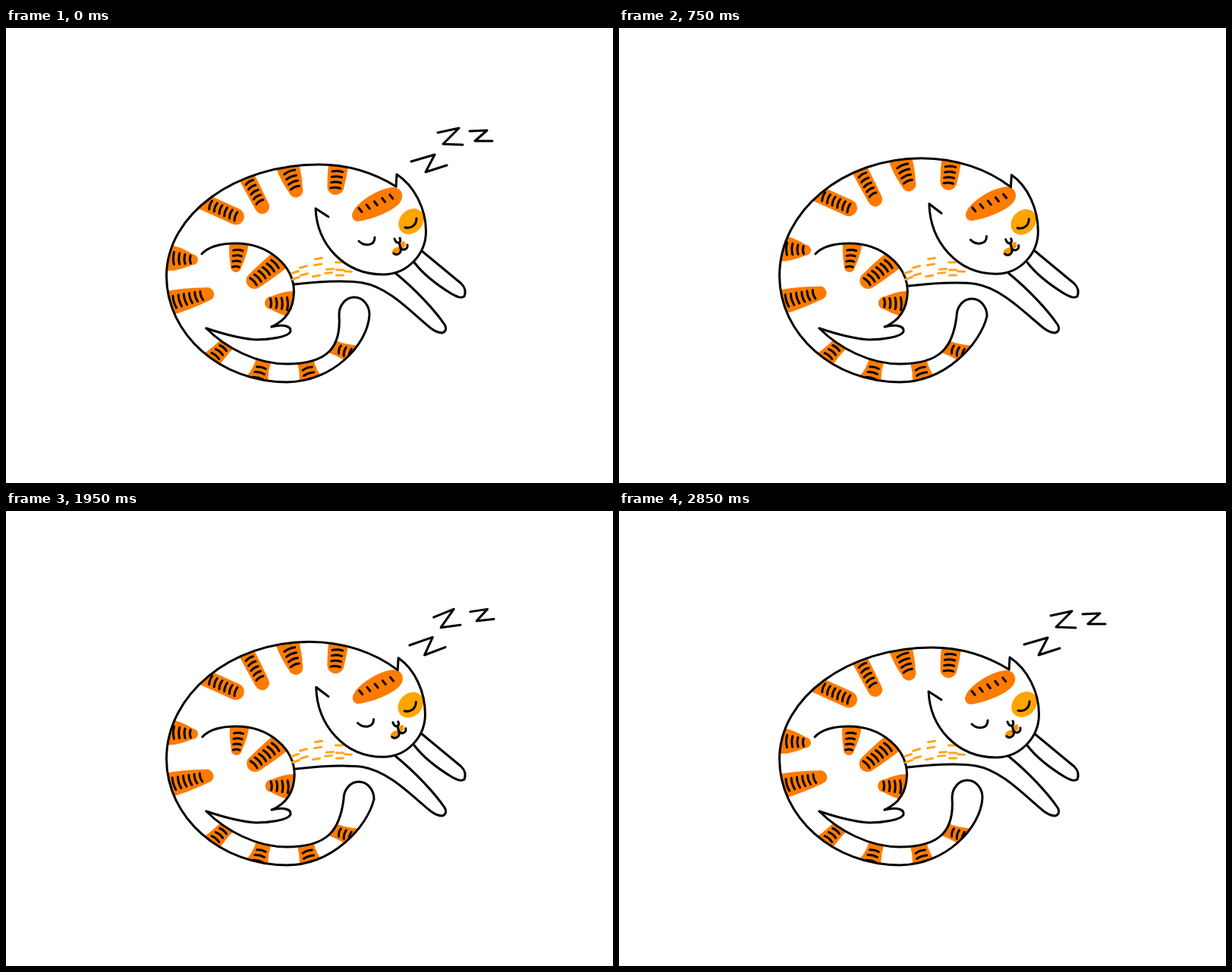
Write an HTML page with a canvas that moves like this. It is 800 by 600 pixels and loops after 2880 ms.

```html
<!DOCTYPE html>
<html>
<head>
<meta charset="utf-8">
<style>
html, body { margin: 0; width: 100%; height: 100%; overflow: hidden; background: #fff }
canvas { display: block }
</style>
</head>
<body>
<canvas width="800" height="600"></canvas>
<script>
const ctx = document.querySelector('canvas').getContext('2d');
const LOOP = 2880, ORANGE = '#ff7b00', AMBER = '#ffa500';
const clamp = x => Math.max(0, Math.min(1, x));
const ease = x => (1 - Math.cos(Math.PI * clamp(x))) / 2;

function line(path, color = '#000') {
  ctx.strokeStyle = color;
  ctx.stroke(new Path2D(path));
}

function fill(path, color) {
  ctx.fillStyle = color;
  ctx.fill(new Path2D(path));
}

function shifted(dx, dy, paint) {
  ctx.save();
  ctx.translate(dx, dy);
  paint();
  ctx.restore();
}

// quarter ellipse; the first end is flat (horizontal) or upright (vertical)
function quarter(x0, y0, x1, y1, flat) {
  const k = 0.55, dx = (x1 - x0) * k, dy = (y1 - y0) * k;
  return flat ? `C${x0 + dx},${y0} ${x1},${y1 - dy} ${x1},${y1}`
    : `C${x0},${y0 + dy} ${x1 - dx},${y1} ${x1},${y1}`;
}

// tapered band with a round tip and evenly spaced rungs across it
function stripe(x0, y0, x1, y1, w0, w1, rungs) {
  const len = Math.hypot(x1 - x0, y1 - y0), a = w0 / 2, b = w1 / 2;
  ctx.save();
  ctx.translate(x0, y0);
  ctx.rotate(Math.atan2(y1 - y0, x1 - x0));
  fill(`M-8,${-a} L0,${-a} Q${len / 3},${-a} ${len - b},${-b} A${b},${b} 0 0 1 ${len - b},${b}
    Q${len / 3},${a} 0,${a} L-8,${a} Z`, ORANGE);
  for (let i = 0; i < rungs; i++) {
    const x = 8 + 7.3 * i, half = 0.27 * (w0 + (w1 - w0) * x / len);
    line(`M${x},${-half} Q${x - 1.5},0 ${x + 1},${half}`);
  }
  ctx.restore();
}

function body(b, wag) {
  const topX = 412 - 17 * b, topY = 180 - 10.5 * b;
  const tipX = 459 + 6 * wag, tipY = 355 + 2 * wag, r = 20, side = tipY + 23;
  const outline = `M${514 + 3 * b},${209 + b} C${485 + b},${191 - 6 * b} ${topX + 38 + 10 * b},${topY} ${topX},${topY}`
    + quarter(topX, topY, 211.5, 327, true) + quarter(211.5, 327, 370, 467, false)
    + `C430,467 ${477 - wag},${418 - wag} ${tipX + r},${side}`
    + quarter(tipX + r, side, tipX, tipY, false) + quarter(tipX, tipY, tipX - r, side, true)
    + `C${442 - 2 * wag},420 425,443 370,443 C330,443 290,422 264,396`;

  ctx.save();
  ctx.clip(new Path2D(outline));
  // the back rises more toward the rear
  const back = (x, ...rest) => shifted(0, -b * (8 + (435 - x) / 28), () => stripe(x, ...rest));
  back(438, 181, 433, 220, 26, 22, 4);
  back(371, 182, 385, 223, 30, 19, 4);
  back(317, 196, 342, 244, 21, 19, 5);
  back(262, 230, 313, 253, 22, 22, 6);
  back(213, 303, 253, 306, 34, 14, 4);
  shifted(-b, -2 * b, () => stripe(214, 363, 274, 349, 32, 18, 6));
  stripe(292, 416, 261, 448, 20, 26, 3);
  stripe(339, 440, 327, 478, 20, 30, 3);
  stripe(395, 441, 406, 482, 22, 32, 3);
  stripe(432, 421, 474, 437, 18, 28, 3);
  ctx.restore();
  line(outline);
}

function haunch(b) {
  const outline = 'M258,298 C268,287 285,284 303,284' + quarter(303, 284, 379.5, 348, true)
    + 'C379,372 368,386 350,394';
  shifted(b, 0, () => {
    ctx.save();
    ctx.clip(new Path2D(outline));
    stripe(307, 285, 302, 322, 25, 14, 4);
    stripe(361, 306, 319, 340, 27, 22, 6);
    stripe(379, 364, 341, 362, 34, 17, 4);
    ctx.restore();
    line(outline);
  });
  line('M350,394 C368,390 376,394 375,400 C372,408 345,411 330,411 C310,410 285,403 264,396');
}

function legsAndChest(b) {
  line('M548,294 L600,337 C606,343 606,349 604,354 C599,357 594,354 588,351 C570,340 550,325 538,309');
  line(`M513,323 C540,345 565,372 578,391 C582,398 578,401 575,402 C568,402 564,399 560,396
    C535,376 505,${342 + 2 * b} 470,${336 + 2 * b} C445,${332 + 3 * b} 415,${334 + 3 * b} 380,${338 + 3 * b}`);
  const spots = [[412, 304], [411, 312], [392, 315], [381, 322], [382, 330], [393, 325], [409, 327],
    [425, 323], [427, 318], [439, 309], [440, 319], [451, 321], [440, 326]];
  for (const [x, y] of spots) {
    const rise = (440 - x) / 40;
    line(`M${x - 4.5},${y + rise} L${x + 4.5},${y - rise}`, '#ffa51f');
  }
}

function head(b, ear) {
  shifted(b, -b, () => {
    fill('M457,251 C450,239 485,212 510,210 C522,210 524,222 521,227 C515,241 480,253 464,255 Q459,255 457,251', ORANGE);
    for (let i = 0; i < 5; i++) {
      const x = 467 + 10.2 * i, y = 240 - 4.4 * i;
      line(`M${x - 2},${y - 2.5} L${x + 2},${y + 2.5}`);
    }
  });
  shifted(-b, b, () => {
    ctx.fillStyle = AMBER;
    ctx.beginPath();
    ctx.ellipse(534, 255, 18.5, 15, -0.8, 0, 7);
    ctx.fill();
    line('M526,263 C534,265 541,260 541,251');
  });
  shifted(-2 * b, -2 * b, () => line('M465,281 C472,288 486,288 486,276'));
  shifted(-3 * b, b, () => {
    fill('M520,289 C510,287 505,298 512,300 C520,300 522,295 520,289 Q517,283 525,281 Q530,289 520,291', '#ff9500');
    line('M512,278 Q514,284 518,283 Q521,281 519,277 M518,283 L520,290');
    line('M511,297 C515,301 522,297 520,290 C523,294 530,292 529,286');
  });

  const tip = `${408 - 7 * ear + b},${238 + 9 * ear - 8 * b}`, rightX = 553.5 - 1.5 * b;
  line(`M${514 + 3 * b},${209 + b} L${515 + 3 * b},${193 + b} C${538 + b},${208 + b} ${rightX},238 ${rightX},268`
    + quarter(rightX, 268, 497, 325 - b, false)
    + `C445,${325 - b} ${410 + 3 * ear},${285 - 5 * b} ${tip}
    Q${416 - 5 * ear},${243 + ear - 7 * b} ${425 - 2 * ear},${249 - 6 * b}`);
}

function zed(x, y, tilt, scale, shape) {
  ctx.save();
  ctx.translate(x, y);
  ctx.rotate(tilt);
  ctx.scale(scale, scale);
  if (scale > 0) line(shape);
  ctx.restore();
}

function draw(t) {
  const b = t < 1260 ? ease(t / 1080) : 1 - ease((t - 1440) / 1440);
  const wag = ease(t / 500) * (1 - ease((t - 2340) / 520));
  const ear = Math.sin(Math.PI * clamp((t - 2160) / 240));

  ctx.fillStyle = '#fff';
  ctx.fillRect(0, 0, 800, 600);
  ctx.lineCap = ctx.lineJoin = 'round';
  ctx.lineWidth = 3;
  body(b, wag);
  haunch(b);
  legsAndChest(b);
  head(b, ear);

  // the letters appear and leave one after another
  const size = i => t < 1000
    ? 1 - ease((t - 120 - 90 * i) / 150)
    : Math.sin(Math.PI / 2 * clamp((t - 1416 - 97 * i) / 150));
  zed(553 - 2 * b, 190, -0.07 * b, size(0), 'M-19,-14 L12,-23 L0,0 L28,-9');
  zed(576 - 4 * b, 153 + b, -0.24 * b, size(1), 'M-7,-15 L21,-21 L0,0 L26,1');
  zed(618 + 3 * b, 149 - 5.5 * b, -0.15 * b, size(2), 'M-7,-13 L16,-14 L0,0 L23,0');
}

function tick() {
  draw(Math.floor(performance.now() % LOOP / 30) * 30);
  requestAnimationFrame(tick);
}
tick();
</script>
</body>
</html>
```
